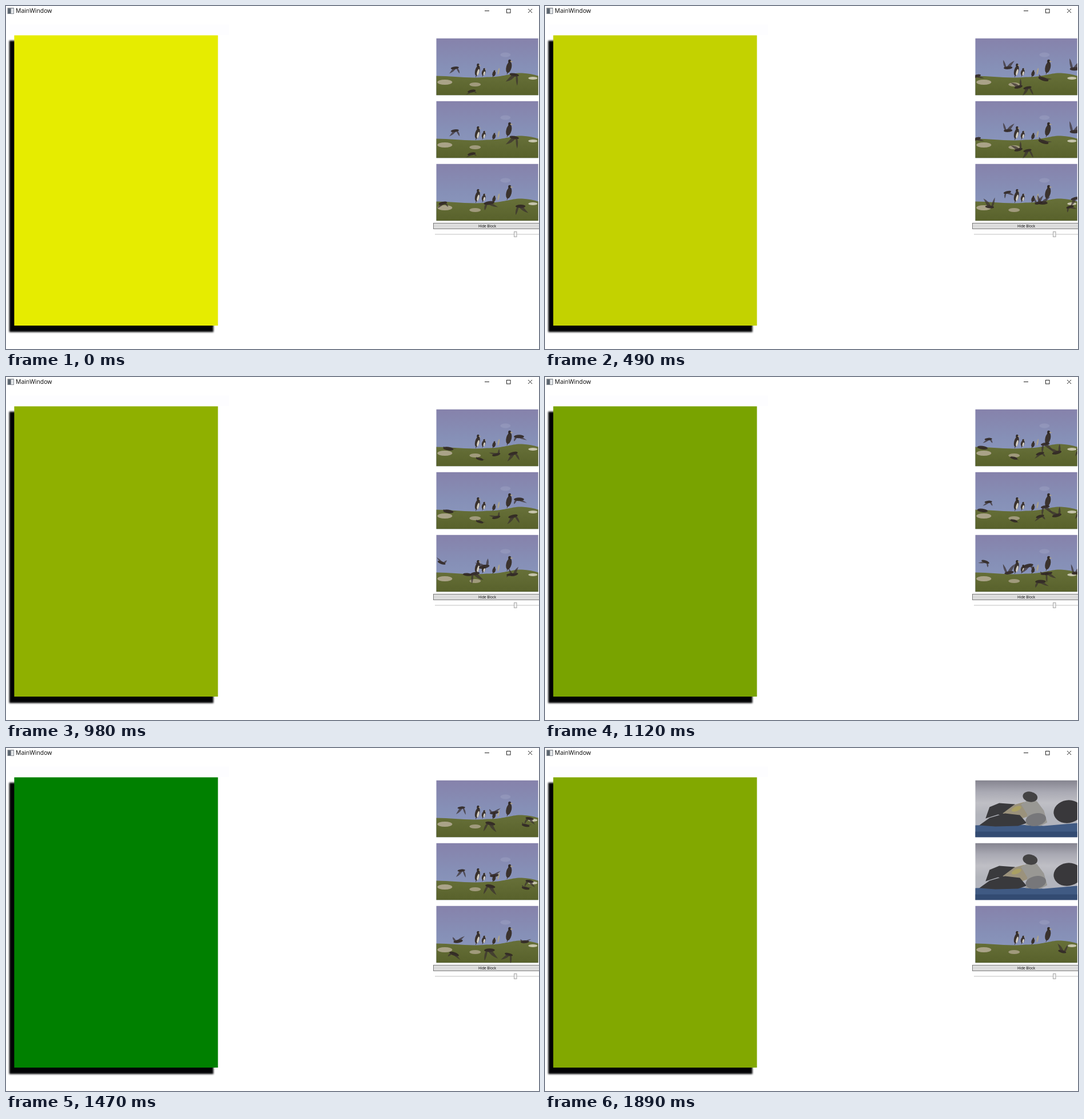
Animation of 932 by 601 pixels, one loop 1.96 s. Source, as an HTML page with a canvas:

```html
<!DOCTYPE html>
<html lang="en">
<head>
<meta charset="utf-8">
<title>MainWindow</title>
<style>
html, body { margin: 0; width: 100%; height: 100%; overflow: hidden; background: #fff; }
canvas { display: block; }
</style>
</head>
<body>
<canvas id="stage" width="932" height="601"></canvas>
<script>
const ctx = document.getElementById('stage').getContext('2d');
const LOOP = 1960, STEP = 70, PW = 178.5, PH = 100;
const FLOCK = 16, FLIGHT = 1700, VISIBLE = 330;

const fract = v => v - Math.floor(v);
const hash = n => fract(Math.sin(n * 127.1 + 11.7) * 43758.5453);

function rect(x, y, w, h, fill) {
  ctx.fillStyle = fill;
  ctx.fillRect(x, y, w, h);
}

function frame(x, y, w, h, stroke) {
  ctx.strokeStyle = stroke;
  ctx.strokeRect(x, y, w, h);
}

function line(stroke, x0, y0, x1, y1) {
  ctx.strokeStyle = stroke;
  ctx.beginPath();
  ctx.moveTo(x0, y0);
  ctx.lineTo(x1, y1);
  ctx.stroke();
}

function oval(x, y, rx, ry, fill, turn = 0) {
  ctx.fillStyle = fill;
  ctx.beginPath();
  ctx.ellipse(x, y, rx, ry, turn, 0, 7);
  ctx.fill();
}

function poly(fill, ...p) {
  ctx.fillStyle = fill;
  ctx.beginPath();
  for (let i = 0; i < p.length; i += 2) ctx.lineTo(p[i], p[i + 1]);
  ctx.fill();
}

function fade(...colors) {
  const g = ctx.createLinearGradient(0, 0, 0, PH);
  colors.forEach((c, i) => g.addColorStop(i / (colors.length - 1), c));
  return g;
}

function text(str, x, y, size, align = 'left') {
  ctx.font = `${size}px "Open Sans", "Noto Sans", sans-serif`;
  ctx.textAlign = align;
  ctx.fillStyle = '#000';
  ctx.fillText(str, x, y);
}

// Yellow to green and back, mixed in linear light
function blockColor(t) {
  const fall = .79 - .00046 * t - 6.6e-8 * t * t;
  const rise = .00064 * (t - 1541);
  const p = Math.max(0, t < 1500 ? fall : rise);
  const srgb = v => Math.round(255 *
    (v <= .0031308 ? 12.92 * v : 1.055 * v ** (1 / 2.4) - .055));
  return `rgb(${srgb(p)}, ${srgb(.216 + .784 * p)}, 0)`;
}

function flyer(seed, x, y, dt) {
  const dir = hash(seed) < .5 ? -1 : 1;
  const size = .7 + hash(seed + 3) * .35;
  const lift = Math.cos(dt / 45 + hash(seed + 5) * 6);
  ctx.save();
  ctx.translate(x + dir * dt * .06, y - dt * .012);
  ctx.scale(dir * size, size);
  ctx.rotate(-.35 + hash(seed + 7) * .7);
  oval(0, 0, 9, 3, 'rgba(48, 39, 35, .9)');
  ctx.fillStyle = 'rgba(58, 47, 48, .7)';
  ctx.beginPath();
  ctx.moveTo(-4, 0);
  ctx.quadraticCurveTo(-9, -8 * lift, -14, -16 * lift);
  ctx.quadraticCurveTo(-1, -11 * lift, 3, 0);
  ctx.quadraticCurveTo(5, -14 * lift, 9, -20 * lift);
  ctx.quadraticCurveTo(10, -8 * lift, 6, 1);
  ctx.fill();
  ctx.restore();
}

// Birds cross the ridge one after another, spread evenly in time and width
function flock(t, seed) {
  for (let i = 0; i < FLOCK; i++) {
    const dt = t - (i + .5) / FLOCK * FLIGHT;
    if (Math.abs(dt) > VISIBLE) continue;
    const s = seed + i * 13;
    flyer(s, PW * fract(i * .618 + seed * .1), 48 + 42 * hash(s + 1), dt);
  }
}

function perched(x, top, foot, w, belly) {
  const h = foot - top;
  oval(x, top + h * .56, w, h * .4, '#3a322e', .25);
  oval(x + w * .3, top + h * .14, w * .55, h * .13, '#302a29');
  poly('#b0a184', x + w * .6, top + h * .1, x + w * 1.7, top + h * .16, x + w * .6, top + h * .2);
  if (belly) oval(x + w * .3, top + h * .68, w * .45, h * .25, '#d5d0c6', .25);
  line('#3a322e', x - w * .4, foot - 3, x - w * .7, foot + 1);
}

function meadow(t, seed) {
  rect(0, 0, PW, PH, fade('#8682ab', '#8690b7', '#8c9ac0'));
  oval(121, 29, 9, 4, 'rgba(160, 165, 197, .4)');
  ctx.fillStyle = fade('#66703a', '#66703a', '#656e37', '#58612b');
  ctx.beginPath();
  ctx.moveTo(0, 66);
  ctx.bezierCurveTo(30, 66, 55, 71, 88, 68);
  ctx.bezierCurveTo(120, 68, 132, 60, 150, 61);
  ctx.quadraticCurveTo(167, 62, PW, 66);
  ctx.lineTo(PW, PH);
  ctx.lineTo(0, PH);
  ctx.fill();
  oval(15, 77, 13, 4.5, '#aaa388');
  oval(68, 81, 10, 3.5, '#a09a7c');
  oval(169, 70, 8, 2.5, '#c6c4ac');
  perched(72, 44, 67, 4, true);
  perched(83, 52, 66, 3.2, true);
  perched(101, 56, 67, 2.8, false);
  oval(109, 58, 1.5, 6, '#aaa38e', .2);
  perched(127, 37, 62, 4.6, false);
  flock(t, seed);
}

function beach() {
  rect(0, 0, PW, PH, fade('#85848f', '#a9a9b3', '#bfbfc5', '#b2b4bb', '#b2b4bd', '#aab0bd'));
  poly('#405a83', 0, 79, 60, 77, 120, 80, PW, 75, PW, PH, 0, PH);
  rect(0, 90, PW, 10, 'rgba(43, 66, 104, .6)');
  poly('#3a3a3d', 18, 67, 25, 47, 42, 40, 69, 42, 85, 58, 70, 70, 40, 60);
  poly('#9b927c', 48, 58, 68, 43, 86, 38, 96, 62, 76, 69);
  oval(72, 50, 9, 4, '#aaa064', -.4);
  poly('#39393c', 7, 79, 25, 66, 52, 58, 78, 61, 90, 75, 75, 80, 35, 81);
  poly('#999894', 80, 42, 94, 34, 108, 37, 120, 53, 126, 74, 114, 80, 88, 79, 91, 60);
  oval(106, 69, 18, 11, '#77777a', -.2);
  oval(96, 29, 13, 9, '#444344', .2);
  oval(162, 55, 25, 20, '#39383b', -.15);
}

function photo(y, draw) {
  ctx.save();
  ctx.translate(752.3, y);
  ctx.beginPath();
  ctx.rect(0, 0, PW, PH);
  ctx.clip();
  draw();
  ctx.restore();
}

function chrome() {
  rect(2.5, 3, 11.5, 11, '#8b9097');
  rect(3.5, 4.5, 4.5, 8.5, '#59636d');
  rect(9, 4.5, 4, 8.5, '#e4e7e9');
  text('MainWindow', 17, 12, 10.4);
  line('#222', 837, 8.5, 845, 8.5);
  frame(875.5, 5.5, 6.5, 6.5, '#222');
  line('#222', 913, 5, 920, 12);
  line('#222', 920, 5, 913, 12);
}

function controls() {
  rect(747.5, 380.5, 186, 10, '#dcdcdc');
  frame(747.5, 380.5, 186, 10, '#7c7c7c');
  text('Hide Block', 841.5, 388.3, 6.3, 'center');
  rect(750, 399, 182, 2, '#dedede');
  rect(888.5, 395.5, 4.5, 9, '#f0f0f0');
  frame(888.5, 395.5, 4.5, 9, '#a8a8a8');
}

function block(t) {
  rect(6, 32, 384, 19, '#fdfdff');
  ctx.save();
  ctx.filter = 'blur(1.4px)';
  rect(5.7, 60.7, 357, 510.6, '#020305');
  ctx.restore();
  rect(14.4, 51.4, 356.2, 508.6, blockColor(t));
}

function draw(now) {
  let t = Math.floor(now % LOOP / STEP) * STEP;
  if (t === 1050) t -= STEP; // the picture holds here for two steps
  ctx.lineWidth = 1;
  rect(0, 0, 932, 601, '#fff');
  chrome();
  block(t);
  const top = () => t >= 1820 ? beach() : meadow(t, 2);
  photo(56.5, top);
  photo(166.5, top);
  photo(276.5, () => meadow(t, 5));
  controls();
}

const start = performance.now();
function tick() {
  draw(performance.now() - start);
  requestAnimationFrame(tick);
}
tick();
</script>
</body>
</html>
```
